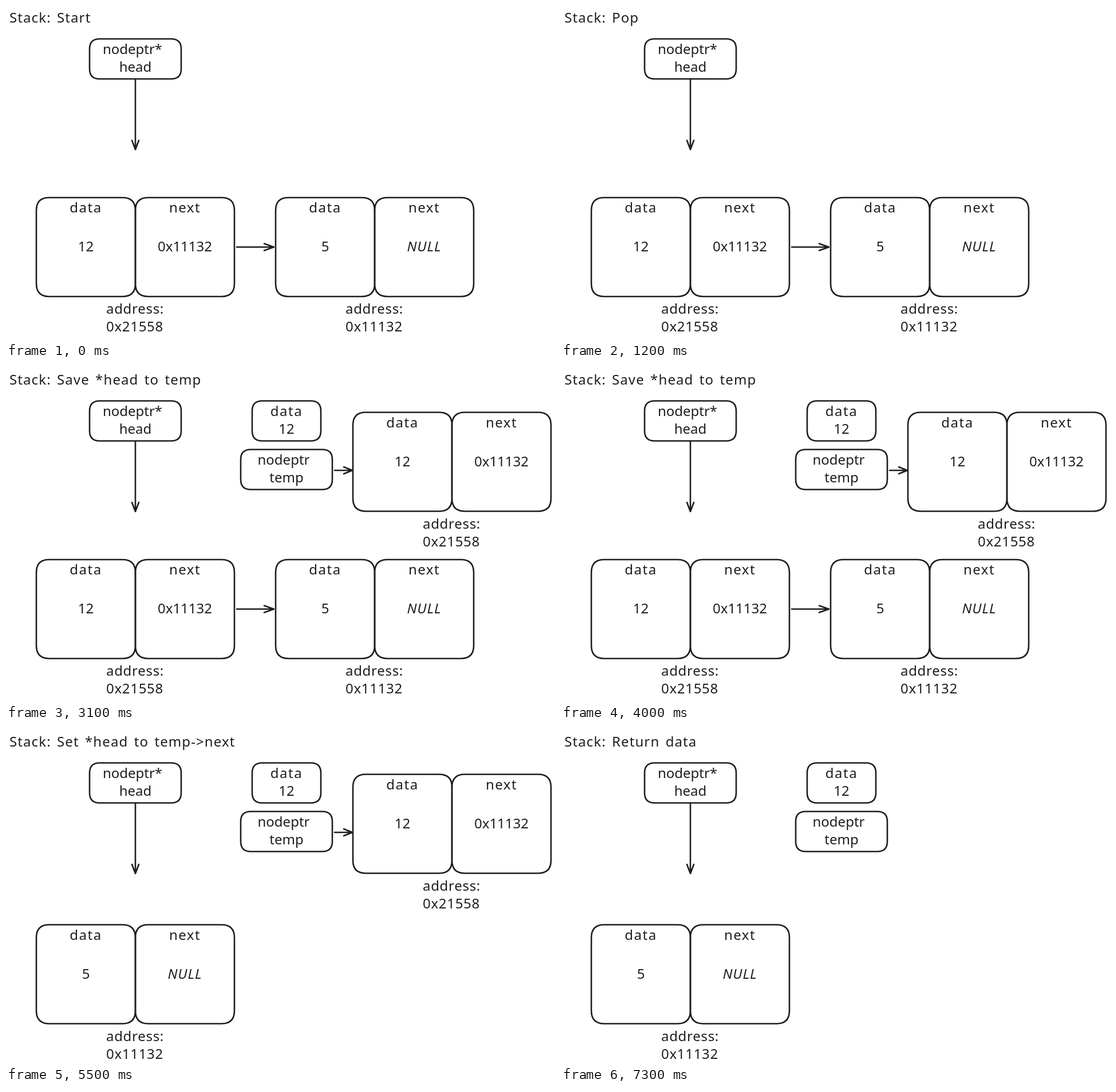
An HTML page for the animation above (8500 ms loop, 959 by 584 pixels).

```html
<!DOCTYPE html>
<html lang="en">
<head>
<meta charset="utf-8">
<title>Stack pop</title>
<style>
  html, body { margin: 0; width: 100%; height: 100%; overflow: hidden; background: #fff; }
  svg { display: block; width: 100%; height: 100%; }
  path { fill: none; stroke: #1e1e1e; stroke-width: 2.6; stroke-linecap: round; stroke-linejoin: round; }
  text { font: 24px "Noto Sans", "Open Sans", sans-serif; fill: #1e1e1e; text-anchor: middle; }
  .left { text-anchor: start; letter-spacing: 0.7px; }
  .title { text-anchor: start; letter-spacing: 1.1px; word-spacing: 3px; }
  .label { letter-spacing: 1.5px; }
  .null { font-style: italic; letter-spacing: 1px; }
</style>
</head>
<body>
<svg id="stage" viewBox="0 0 959 584"></svg>
<script>
const LOOP = 8500;
const stage = document.getElementById('stage');
const timed = [];

function add(parent, tag, attrs = {}, content = '') {
  const el = document.createElementNS(stage.namespaceURI, tag);
  for (const key in attrs) el.setAttribute(key, attrs[key]);
  el.textContent = content;
  return parent.appendChild(el);
}

// A group that is visible from one time of the loop up to another.
function during(from, to) {
  const el = add(stage, 'g');
  timed.push({ el, from, to });
  return el;
}

const text = (g, x, y, content, style = '') =>
  add(g, 'text', { x, y, class: style }, content);

function box(g, x, y, w, h, r) {
  add(g, 'path', { d: `M${x + r} ${y}h${w - 2 * r}q${r} 0 ${r} ${r}v${h - 2 * r}q0 ${r} ${-r} ${r}` +
    `h${2 * r - w}q${-r} 0 ${-r} ${-r}v${2 * r - h}q0 ${-r} ${r} ${-r}z` });
}

function arrow(g, x, y, length, barb, angle = 0) {
  add(g, 'path', {
    d: `M0 0H${length}M${length - barb} -6L${length} 0L${length - barb} 6`,
    transform: `translate(${x} ${y}) rotate(${angle})`
  });
}

function variable(g, x, y, w, type, name, shift = 0, style = '') {
  box(g, x, y, w, 70, 17.5);
  text(g, x + w / 2 + shift, y + 26.5, type, style);
  text(g, x + w / 2, y + 57, name);
}

function node(g, x, y, data, next, address) {
  const size = 173;
  [['data', data], ['next', next]].forEach(([label, value], i) => {
    const left = x + i * size, mid = left + size / 2;
    box(g, left, y, size, size, 22.5);
    text(g, mid, y + 26, label, 'label');
    text(g, mid, y + 94, value, value === 'NULL' ? 'null' : '');
  });
  text(g, x + 122, y + 203, 'address:', 'left');
  text(g, x + 122, y + 234, address, 'left');
}

const titles = [
  [0, 'Start'],
  [1200, 'Pop'],
  [2100, 'Save (*head)->data to data'],
  [3100, 'Save *head to temp'],
  [4600, 'Set *head to temp->next'],
  [6100, 'free temp'],
  [7300, 'Return data']
];
titles.forEach(([from, title], i) => {
  const to = i + 1 < titles.length ? titles[i + 1][0] : LOOP;
  text(during(from, to), 6, 29, 'Stack: ' + title, 'title');
});

const head = during(0, LOOP);
variable(head, 146, 57.5, 160, 'nodeptr*', 'head', -5);
arrow(head, 226, 128, 123, 16, 90);

const list = during(0, 4600);
node(list, 53, 335, '12', '0x11132', '0x21558');
arrow(list, 403, 421.5, 65, 17);
node(list, 471, 335, '5', 'NULL', '0x11132');

variable(during(2100, LOOP), 430, 57.5, 120, 'data', '12', 0, 'label');
variable(during(3100, LOOP), 410, 142.5, 160, 'nodeptr', 'temp', -5);

const saved = during(3100, 6100);
arrow(saved, 574, 179, 31, 15);
node(saved, 606, 77.5, '12', '0x11132', '0x21558');

node(during(4600, LOOP), 53, 340.5, '5', 'NULL', '0x11132');

function draw() {
  const t = performance.now() % LOOP;
  for (const { el, from, to } of timed)
    el.style.display = t >= from && t < to ? '' : 'none';
  requestAnimationFrame(draw);
}
draw();
</script>
</body>
</html>
```
